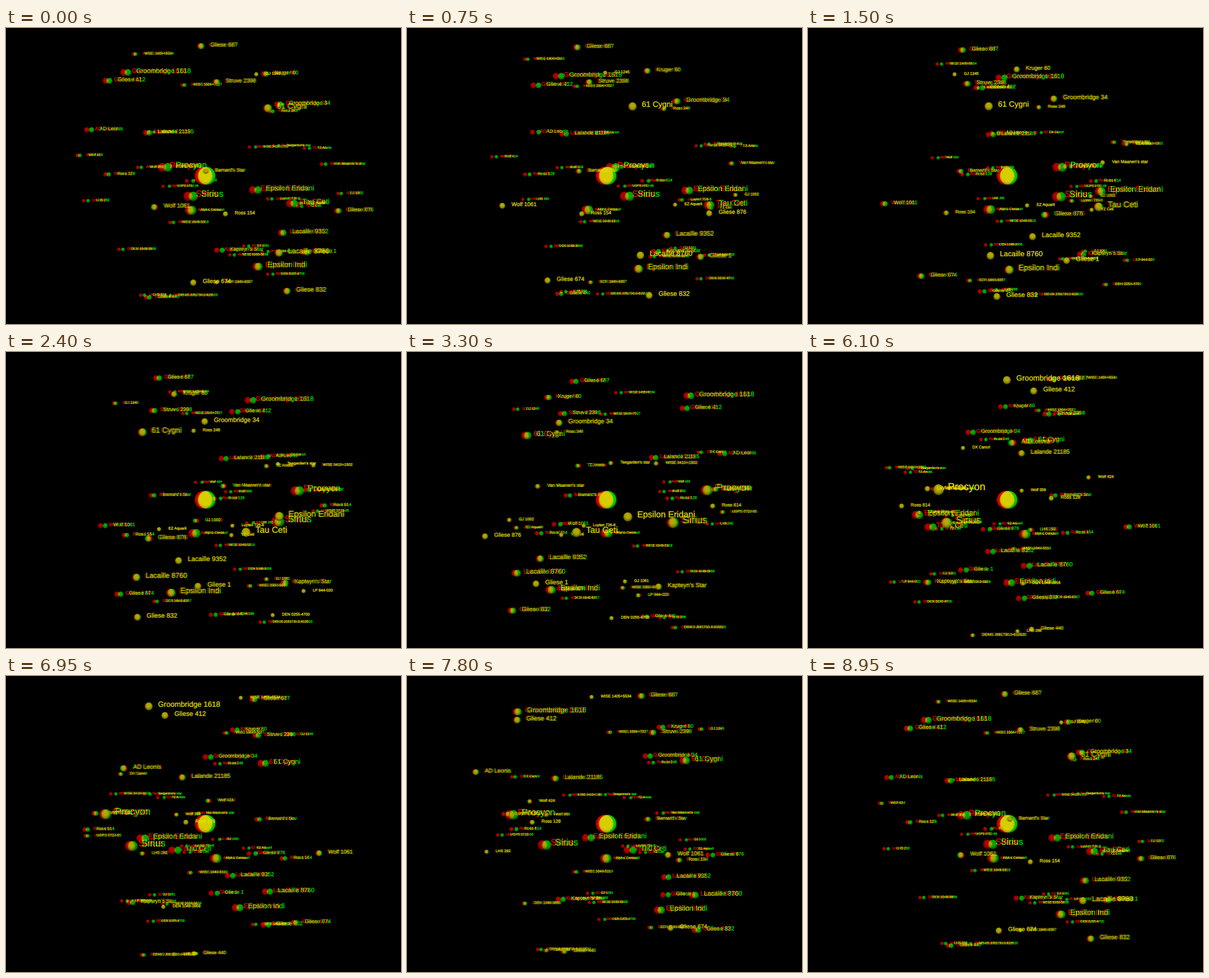
A matplotlib script that plays this animation: 600 px wide and 450 px high, repeating every 9 s.

```python
import numpy as np
import matplotlib.pyplot as plt
from matplotlib.animation import FuncAnimation
from matplotlib.collections import PathCollection
from matplotlib.patches import Rectangle
from matplotlib.path import Path
from matplotlib.textpath import TextPath

W, H = 600, 450
FRAMES, STEP_MS = 180, 50
CX, CY = 302.5, 224.8
SCALE = 13.58      # pixels per light year at the centre
DIST = 104.0       # viewer to centre, light years
FOCUS = 9.5        # depth at which both eyes coincide
PARALLAX = 4800.0
PHASE = 91.0
LABEL_GAP = 13.0

# name, right ascension, declination (degrees), distance (light years)
FAINT = [
    ("Alpha Centauri", 219.9, -60.8, 4.37),
    ("WISE 1405+5534", 211.3, 55.6, 15.75),
    ("WISE 1506+7027", 226.7, 70.5, 10.5),
    ("GJ 1245", 298.5, 44.4, 14.8),
    ("Wolf 424", 188.3, 9.0, 14.2),
    ("Wolf 359", 164.1, 7.0, 7.8),
    ("DX Cancri", 127.5, 26.8, 11.7),
    ("TZ Arietis", 30.05, 13.05, 14.6),
    ("Teegarden's star", 43.25, 16.9, 12.5),
    ("WISE 0410+1502", 62.7, 15.04, 13.8),
    ("UGPS 0722-05", 110.6, -5.7, 13.3),
    ("Luyten 726-8", 24.75, -17.95, 8.73),
    ("YZ Ceti", 18.1, -17.0, 12.1),
    ("GJ 1002", 1.7, -7.54, 15.3),
    ("EZ Aquarii", 339.6, -15.3, 11.3),
    ("LHS 292", 162.05, -11.34, 14.8),
    ("WISE 1049-5319", 162.3, -53.3, 6.6),
    ("DEN 1048-3956", 162.05, -39.94, 13.2),
    ("GJ 1061", 54.0, -44.5, 12.0),
    ("WISE 0350-5658", 57.5, -57.0, 11.1),
    ("LP 944-020", 54.9, -35.4, 16.2),
    ("DEN 0255-4700", 43.8, -47.0, 16.2),
    ("SCR 1845-6357", 281.3, -63.96, 12.6),
    ("LHS 288", 161.1, -61.2, 15.6),
    ("DENIS J081730.0-615520", 124.4, -61.9, 16.1),
]

# the same, then label size
BRIGHT = [
    ("", 0, 0, 0, 25.4),
    ("", 219.9, -60.8, 4.37, 13),
    ("Sirius", 101.3, -16.7, 8.6, 14.6),
    ("Procyon", 114.8, 5.2, 11.4, 14.2),
    ("Tau Ceti", 26.0, -15.94, 11.9, 11.8),
    ("Epsilon Eridani", 53.2, -9.46, 10.5, 11.9),
    ("Epsilon Indi", 330.8, -56.8, 11.8, 11.3),
    ("61 Cygni", 316.7, 38.7, 11.4, 10.9),
    ("Groombridge 1618", 152.84, 49.45, 15.88, 10.4),
    ("Lacaille 8760", 319.3, -38.9, 12.9, 10),
    ("Lacaille 9352", 346.5, -35.9, 10.7, 9.2),
    ("Gliese 412", 166.4, 43.5, 15.8, 9),
    ("Gliese 832", 323.4, -49.0, 16.1, 9),
    ("Groombridge 34", 4.6, 44.0, 11.6, 8.8),
    ("Gliese 1", 1.35, -37.4, 14.2, 8.7),
    ("Lalande 21185", 165.8, 36.0, 8.3, 8.5),
    ("Kapteyn's Star", 77.9, -45.0, 12.8, 8.5),
    ("Gliese 687", 264.1, 68.3, 14.8, 8.3),
    ("Gliese 674", 262.2, -46.9, 14.8, 8.1),
    ("Struve 2398", 280.7, 59.6, 11.5, 8.1),
    ("AD Leonis", 154.9, 19.9, 16.0, 8.1),
    ("Kruger 60", 337.0, 57.7, 13.15, 7.9),
    ("Gliese 876", 343.3, -14.3, 15.3, 7.9),
    ("Wolf 1061", 247.6, -12.7, 14.0, 7.8),
    ("Luyten's Star", 111.85, 5.2, 12.4, 7),
    ("Barnard's Star", 269.5, 4.7, 5.96, 6.8),
    ("Gliese 440", 176.4, -64.8, 15.1, 6.8),
    ("Ross 154", 282.5, -23.8, 9.7, 6.7),
    ("Ross 614", 97.3, -2.8, 13.3, 6.5),
    ("Ross 128", 176.9, 0.8, 11.0, 6.4),
    ("Van Maanen's star", 12.3, 5.4, 14.1, 6),
    ("Ross 248", 355.5, 44.2, 10.3, 5.8),
]

STARS = [s + (5.4,) for s in FAINT] + BRIGHT
NAMES, *COLS = zip(*STARS)
RA, DEC, RANGE, SIZE = (np.array(c, float) for c in COLS)
HEIGHT = RANGE * np.sin(np.radians(DEC))
RADIUS = RANGE * np.cos(np.radians(DEC))

DISC = Path.unit_circle()
FLIP = np.array([1, -1])
LABELS = []
for name in NAMES:
    text = TextPath((0, 0), name, size=1, prop={"family": "Liberation Sans"}) if name else None
    LABELS.append(text and (text.vertices * FLIP, text.codes))

# nested discs: radius, upward shift, brightness
STAR_SHADES = [(1.0, 0.0, 0.28), (0.94, 0.05, 0.42), (0.86, 0.12, 0.53),
               (0.75, 0.19, 0.62), (0.58, 0.25, 0.69)]
SUN_SHADES = [(1.0, 0.0, 0.62), (0.95, 0.05, 0.74), (0.87, 0.13, 0.84)]
TEXT_LEVEL = 0.92
TEXT_STROKE = 0.22


def project(frame):
    turn = np.radians(frame * 360 / FRAMES - RA - PHASE)
    depth = RADIUS * np.cos(turn)
    zoom = DIST / (DIST - depth)
    x = CX - SCALE * zoom * RADIUS * np.sin(turn)
    y = CY - SCALE * zoom * HEIGHT
    split = PARALLAX * (1 / (DIST - FOCUS) - 1 / (DIST - depth)) / 2
    return x, y, depth, zoom, split


def build_scene(x, y, depth, zoom):
    """Paths, brightness and stroke width of all parts, far to near."""
    parts = []
    for i in np.argsort(depth, kind="stable"):
        centre = np.array([x[i], y[i]])
        size = SIZE[i] * zoom[i]
        r = 0.53 * size
        for k, lift, level in STAR_SHADES if RANGE[i] else SUN_SHADES:
            verts = DISC.vertices * (r * k) + centre - [0, r * lift]
            parts.append((Path(verts, DISC.codes), level, 0))
        if LABELS[i]:
            verts, codes = LABELS[i]
            start = centre + [LABEL_GAP * zoom[i], 0.5]
            parts.append((Path(verts * size + start, codes), TEXT_LEVEL, TEXT_STROKE))
    return zip(*parts)


class Eye:
    """One coloured view of the scene in its own full-size axes."""

    def __init__(self, fig, channel, side, gain, blend):
        self.channel, self.side, self.gain = channel, side, gain
        ax = fig.add_axes([0, 0, 1, 1], zorder=channel)
        ax.set(xlim=(0, W), ylim=(H, 0))
        ax.axis("off")
        ax.add_patch(Rectangle((-2, -2), W + 4, H + 4, color="black", zorder=0))
        self.shapes = PathCollection([], zorder=1)
        self.shapes.set_snap(False)
        ax.add_collection(self.shapes, autolim=False)
        ax.set_agg_filter(blend)

    def show(self, x, y, depth, zoom, split):
        paths, levels, strokes = build_scene(x + self.side * split, y, depth, zoom)
        colors = np.zeros((len(paths), 4))
        colors[:, self.channel] = np.array(levels) * self.gain
        colors[:, 3] = 1
        self.shapes.set_paths(paths)
        self.shapes.set_facecolor(colors)
        self.shapes.set_edgecolor(colors)
        self.shapes.set_linewidth(strokes)


layer = {}


def keep_red(img, dpi):
    layer["red"] = img[..., 0].copy()
    return img, 0, 0


def add_red(img, dpi):
    out = img.copy()
    out[..., 0] = layer["red"]
    return out, 0, 0


fig = plt.figure(figsize=(W / 100, H / 100), dpi=100, facecolor="black")
eyes = [Eye(fig, 0, -1, 1.0, keep_red), Eye(fig, 1, 1, 0.96, add_red)]


def update(frame):
    view = project(frame)
    for eye in eyes:
        eye.show(*view)
    return [eye.shapes for eye in eyes]


anim = FuncAnimation(fig, update, frames=FRAMES, interval=STEP_MS,
                     init_func=lambda: update(0), repeat=True, repeat_delay=0, blit=False)
plt.show()
```
